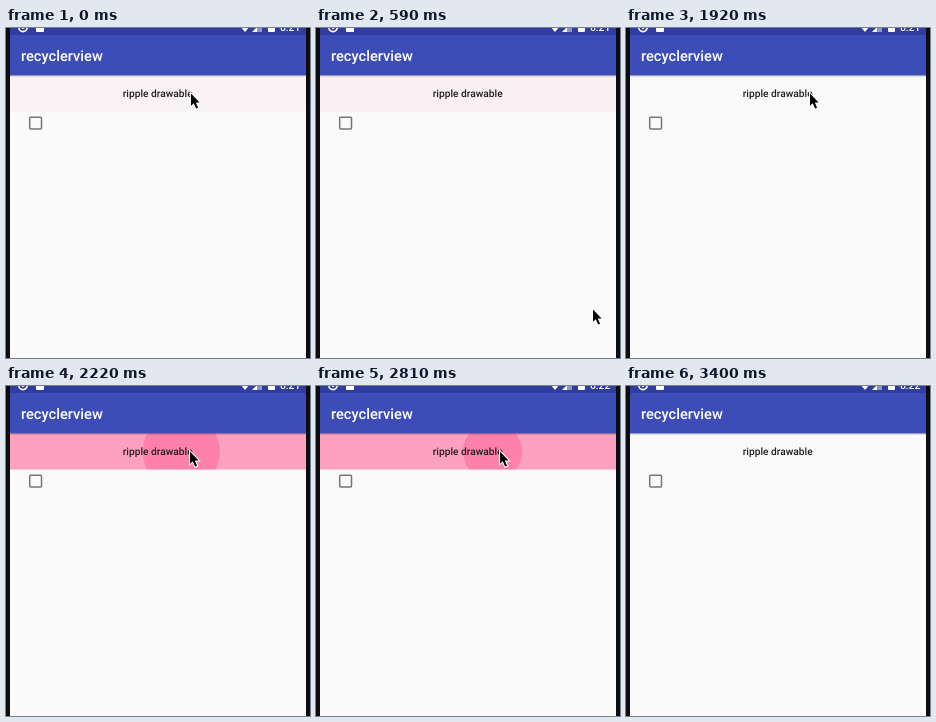
Write an HTML page that moves like this. It is 304 px wide and 330 px high and loops after 4.14 s.

```html
<!DOCTYPE html>
<html lang="en">
<head>
<meta charset="utf-8">
<title>Ripple drawable</title>
<style>
  html, body { margin: 0; width: 100%; height: 100%; overflow: hidden; background: #0d0d0f; }
  svg { display: block; width: 304px; height: 330px; }
  text { font-family: Roboto, sans-serif; font-weight: 500; text-rendering: geometricPrecision; }
</style>
</head>
<body>
<svg viewBox="0 0 304 330">
  <defs>
    <clipPath id="rowClip"><rect x="4" y="47" width="296" height="36.4"/></clipPath>
    <linearGradient id="shade" x2="0" y2="1">
      <stop stop-color="#000" stop-opacity=".3"/>
      <stop offset="1" stop-color="#000" stop-opacity="0"/>
    </linearGradient>
  </defs>

  <rect width="304" height="330" fill="#0d0d0f"/>
  <rect x="4" width="296" height="330" fill="#fafafa"/>

  <!-- list row with ripple -->
  <g clip-path="url(#rowClip)" fill="#ff4081">
    <rect id="wash" x="4" y="47" width="296" height="37"/>
    <circle id="ripple" cy="65.5"/>
  </g>
  <text x="151.7" y="69.3" font-size="10.2" text-anchor="middle" fill="#1f1f1f">ripple drawable</text>
  <rect x="23.7" y="89.2" width="11.8" height="11.8" rx="1" fill="none" stroke="#757575" stroke-width="1.5"/>

  <!-- app bar -->
  <rect x="4" y="47" width="296" height="2.5" fill="url(#shade)"/>
  <rect x="4" y="7" width="296" height="40.3" fill="#3d4db7"/>
  <text x="15" y="33" font-size="14.65" fill="#fff">recyclerview</text>

  <!-- status bar -->
  <rect x="4" width="296" height="7" fill="#303c9f"/>
  <g fill="#fff">
    <circle cx="17" cy="-.6" r="4.2" fill="none" stroke="#fff" stroke-width="1.7"/>
    <circle cx="17" cy="-.6" r="1.6"/>
    <rect x="30" y="-4" width="8" height="8" rx="1"/>
    <path d="M234 -2H244L239 4Z"/>
    <path d="M246 4H251V-1Z"/>
    <path d="M251 4H256V-6L251 -1Z" opacity=".45"/>
    <rect x="262" y="-5" width="7" height="9" rx="1"/>
    <text id="clock" x="274" y="3.2" font-size="10.3">6:21</text>
  </g>

  <path id="cursor" d="M1 1.5V13.8L3.8 11.2L6.1 16.6L8.1 15.7L5.8 10.4H9.6Z"
        stroke="#fff" stroke-width="2" paint-order="stroke"/>
</svg>

<script>
  const LOOP = 4140, FRAME = 147.6;   // the picture advances in even ticks
  const $ = id => document.getElementById(id);
  const wash = $('wash'), ripple = $('ripple'), clock = $('clock'), cursor = $('cursor');

  const clamp = v => Math.min(1, Math.max(0, v));
  const mix = (a, b, p) => a + (b - a) * p;
  const glide = p => p * p * p * (p * (p * 6 - 15) + 10);
  const settle = p => 1 - (1 - p) ** 2.2;

  // pointer key points, in ticks; ease shapes the way to each point
  const path = [
    { at: 1, x: 184, y: 64 },
    { at: 4, x: 276, y: 280, ease: glide },
    { at: 7, x: 276, y: 327, ease: settle },
    { at: 8, x: 256, y: 262, ease: settle },
    { at: 9, x: 234, y: 187, ease: settle },
    { at: 13, x: 183, y: 64, ease: settle },
    { at: 19, x: 183, y: 64, ease: glide },
    { at: 22, x: 274, y: 286, ease: glide }
  ];
  const taps = [-0.07, 13.6, 17.93];

  function pointerAt(tick) {
    const i = path.findIndex(k => k.at >= tick);
    if (i < 0) return { x: -50, y: -50 };
    const to = path[i], from = path[i - 1];
    if (!from) return to;
    const p = to.ease((tick - from.at) / (to.at - from.at));
    return { x: mix(from.x, to.x, p), y: mix(from.y, to.y, p) };
  }

  // The wash rises in one tick, holds, then fades; the circle drifts to the row centre.
  function rippleAt(age) {
    const rise = clamp(age), fade = 1 - clamp((age - 2.1) / 3);
    return {
      tint: 0.48 * rise * fade ** 2,
      cx: mix(177, 152, clamp(age / 2.4) ** 5),
      r: Math.min(27.6 * age, 42),
      alpha: 0.32 * rise * clamp((2.6 - age) * 2)
    };
  }

  function draw(t) {
    const tick = Math.floor((t + 5) / FRAME);
    const { x, y } = pointerAt(tick);
    cursor.setAttribute('transform', `translate(${x} ${y})`);

    const { tint, cx, r, alpha } = rippleAt(tick - taps.findLast(tap => tap <= tick));
    wash.setAttribute('opacity', tint);
    ripple.setAttribute('cx', cx);
    ripple.setAttribute('r', r);
    ripple.setAttribute('opacity', alpha);

    clock.textContent = tick < 16 ? '6:21' : '6:22';
  }

  const start = performance.now();
  function run() {
    draw((performance.now() - start) % LOOP);
    requestAnimationFrame(run);
  }
  run();
</script>
</body>
</html>
```
